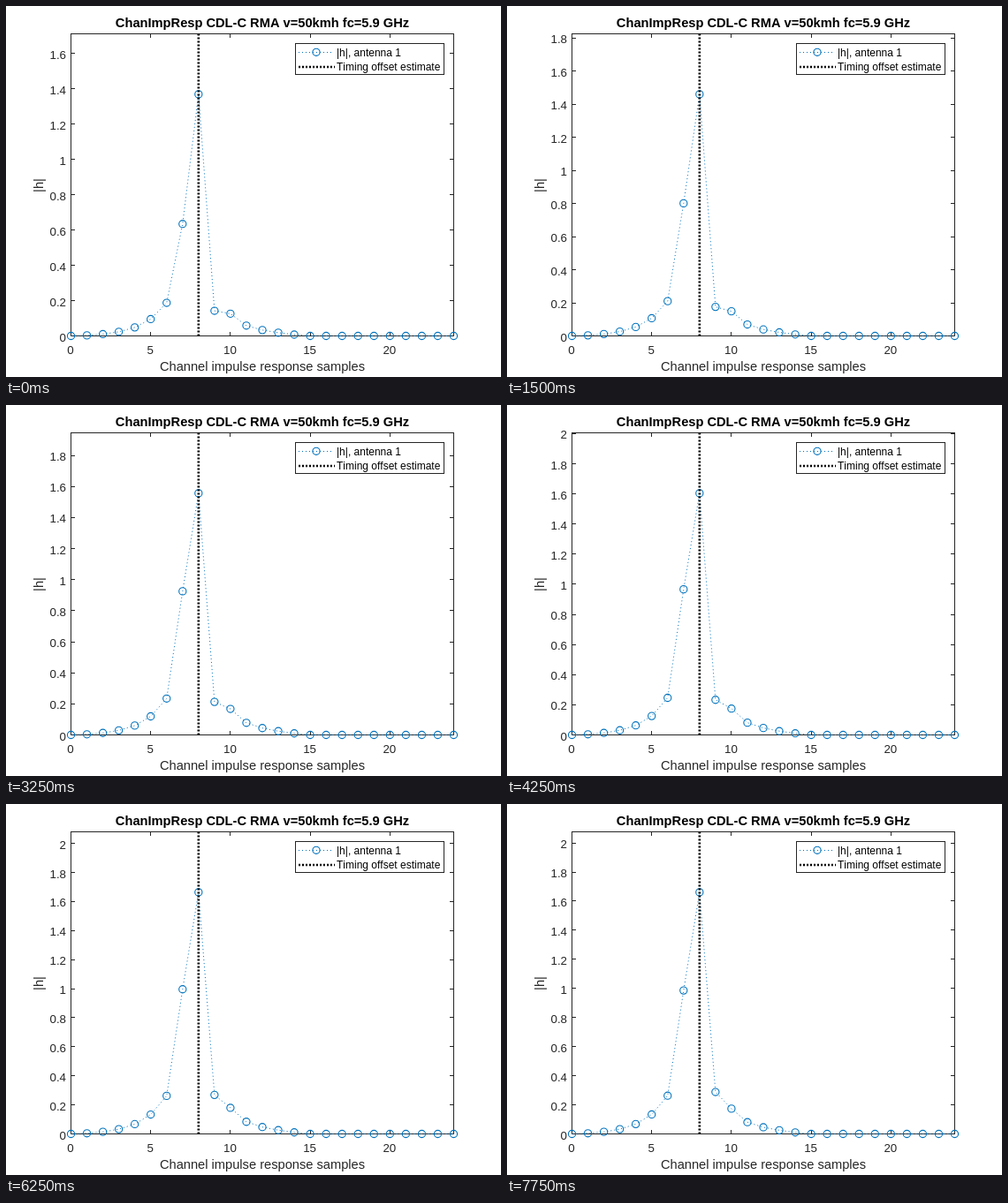
An HTML page that plays this animation: 560x420 px, repeating every 8 s.

```html
<!DOCTYPE html>
<html lang="en">
<head>
<meta charset="utf-8">
<title>Channel impulse response</title>
<style>
  html, body { margin: 0; width: 100%; height: 100%; overflow: hidden; background: #fff; }
  svg { display: block; width: 560px; height: 420px; }
  text { font-family: "Liberation Sans", Arial, sans-serif; font-size: 13.33px; fill: #262626; font-kerning: none; }
  .label { font-size: 14.67px; text-anchor: middle; }
  .title { font-weight: bold; fill: #000; }
  .key { font-size: 12px; fill: #000; }
  .mid { text-anchor: middle; }
  .end { text-anchor: end; }
  .axis { fill: none; stroke: #262626; shape-rendering: crispEdges; }
  .dots { fill: none; stroke: #0072bd; stroke-dasharray: 1 3; }
  .mark { fill: none; stroke: #0072bd; stroke-width: 1.1; }
  .offset { stroke: #000; stroke-width: 2.67; stroke-dasharray: 2 2; }
</style>
</head>
<body>
<svg id="stage" viewBox="0 0 560 420" xmlns="http://www.w3.org/2000/svg"></svg>
<script>
const NS = "http://www.w3.org/2000/svg";
const stage = document.getElementById("stage");
const LEFT = 73.5, RIGHT = 506.5, TOP = 31.5, BASE = 373.5;
const LOOP = 8000, STEP = 250, SAMPLES = 25, PEAK = 8, TICK = 4.5;

function set(el, attrs) {
  for (const k in attrs) el.setAttribute(k, attrs[k]);
}
function add(tag, cls, attrs, text) {
  const el = document.createElementNS(NS, tag);
  el.setAttribute("class", cls);
  set(el, attrs);
  if (text !== undefined) el.textContent = text;
  stage.appendChild(el);
  return el;
}
const px = i => LEFT + i * (RIGHT - LEFT) / (SAMPLES - 1);

// Steady rise that flattens late, and a hump that tops out at time `at`.
const climb = (t, from, slope, bend) => from + slope * t - bend * (t / 7.75) ** 3.55;
const hump = (t, top, span, at, power) => top - span * Math.abs(1 - t / at) ** power;

// |h| of sample i after t seconds.
function level(i, t) {
  if (i <= 6) return climb(t, 0.1875, 0.015, 0.041) * (i / 6) ** (1.95 + 0.35 * i * (i < 6));
  if (i === 7) return hump(t, 0.996, 0.361, 6.4, 2.3);
  if (i === PEAK) return climb(t, 1.37, 0.06, 0.174);
  if (i === 9) return climb(t, 0.1425, 0.022, 0.025);
  const j = i - 10;
  return hump(t, 0.18, 0.054, 5.9, 1.85) * Math.max(0, 1 / (1 + j) - 0.035 * j);
}

// Fixed axes and labels.
add("rect", "axis", { x: LEFT, y: TOP, width: RIGHT - LEFT, height: BASE - TOP });
for (let i = 0; i <= 20; i += 5) {
  const x = Math.floor(px(i)) + 0.5;
  add("path", "axis", { d: `M${x} ${BASE}v${-TICK}M${x} ${TOP}v${TICK}` });
  add("text", "mid", { x: px(i) - 0.5, y: 394 }, i);
}
add("text", "label title", { x: 290, y: 24 }, "ChanImpResp CDL-C RMA v=50kmh fc=5.9 GHz");
add("text", "label", { x: 290, y: 413 }, "Channel impulse response samples");
add("text", "label", { transform: "translate(41.5 203) rotate(-90)" }, "|h|");

const ticks = add("path", "axis", {});
const names = Array.from({ length: 11 }, (_, i) =>
  add("text", "end", { x: 68 }, String(i * 2 / 10)));
const line = add("polyline", "dots", {});
const marks = Array.from({ length: SAMPLES }, (_, i) =>
  add("circle", "mark", { cx: px(i), r: 4.1 }));
add("line", "offset", { x1: px(PEAK), y1: BASE, x2: px(PEAK), y2: TOP });

// Legend.
add("rect", "axis", { x: 327.5, y: 42.5, width: 168, height: 35, style: "fill:#fff" });
add("line", "dots", { x1: 331, y1: 52.5, x2: 371, y2: 52.5 });
add("circle", "mark", { cx: 351, cy: 52.3, r: 4.1 });
add("text", "key", { x: 374, y: 57 }, "|h|, antenna 1");
add("line", "offset", { x1: 331, y1: 69, x2: 372, y2: 69 });
add("text", "key", { x: 374, y: 73 }, "Timing offset estimate");

function draw(ms) {
  const t = Math.floor(ms % LOOP / STEP) * STEP / 1000;
  const h = marks.map((_, i) => level(i, t));
  const top = h[PEAK] * 1.25;
  const py = v => BASE - v / top * (BASE - TOP);

  let d = "";
  names.forEach((el, i) => {
    const v = i * 0.2, shown = v <= top;
    el.style.display = shown ? "" : "none";
    if (!shown) return;
    const y = Math.floor(py(v)) + 0.5;
    d += `M${LEFT} ${y}h${TICK}M${RIGHT} ${y}h${-TICK}`;
    el.setAttribute("y", Math.round(py(v) + 6));
  });
  ticks.setAttribute("d", d);
  line.setAttribute("points", h.map((v, i) => px(i) + "," + py(v)).join(" "));
  marks.forEach((el, i) => el.setAttribute("cy", py(h[i])));
}

const start = performance.now();
function loop() {
  draw(performance.now() - start);
  requestAnimationFrame(loop);
}
loop();
</script>
</body>
</html>
```
